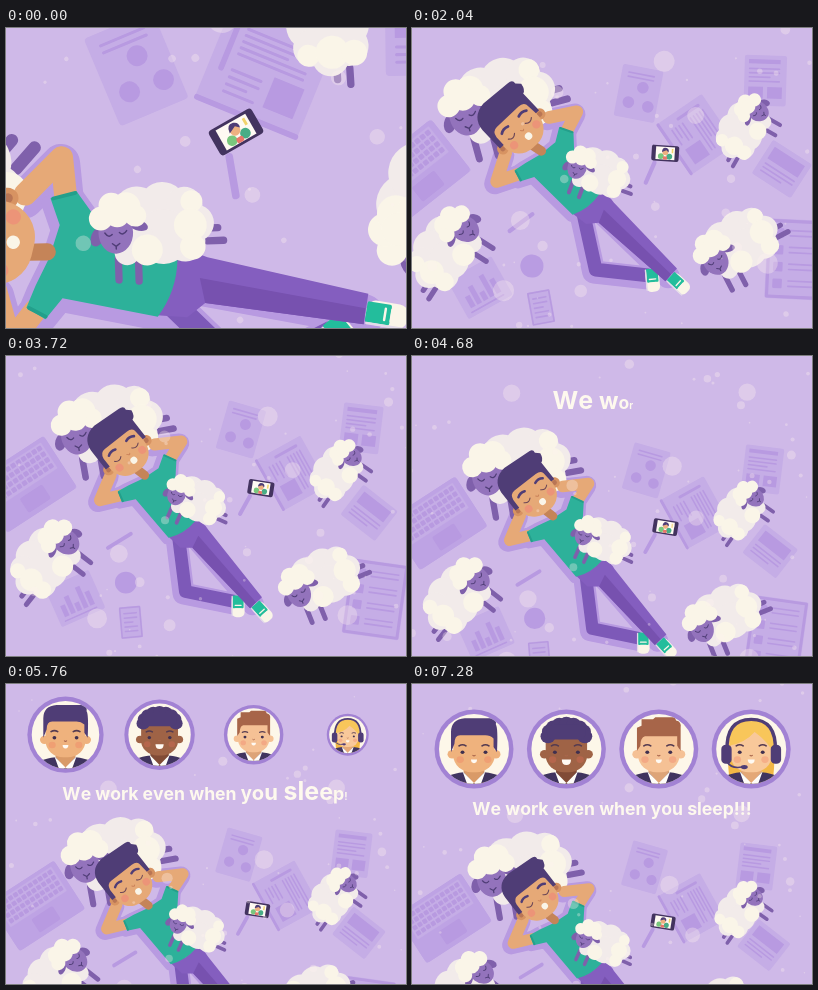
Write an HTML page with a canvas that moves like this. It is 400x300 px and loops after 7.32 s.

```html
<!DOCTYPE html>
<html lang="en">
<head>
<meta charset="utf-8">
<title>We work even when you sleep</title>
<style>
  html, body { margin: 0; width: 100%; height: 100%; overflow: hidden; background: #cfb9e8; }
  canvas { display: block; width: 100vw; height: 100vh; }
</style>
</head>
<body>
<canvas id="stage" width="400" height="300"></canvas>
<script>
const canvas = document.getElementById('stage');
const g = canvas.getContext('2d');
const LOOP = 7320, DEG = Math.PI / 180;
const BG = '#cfb9e8', CREAM = '#faf5e8', WOOL = '#f2ebea', PURPLE = '#9373bc', DARK = '#4f3d76';
const SKIN = '#e6a977', TEAL = '#2db19a', PANTS = '#845ebf', MARK = '#b89ae1', PAPER = '#c5ade6';
const clamp = v => Math.max(0, Math.min(1, v));

function dot(x, y, r, color) {
  g.fillStyle = color;
  g.beginPath();
  g.arc(x, y, r, 0, 7);
  g.fill();
}
function oval(x, y, rx, ry, color, turn = 0) {
  g.fillStyle = color;
  g.beginPath();
  g.ellipse(x, y, rx, ry, turn * DEG, 0, 7);
  g.fill();
}
function box(x, y, w, h, color, r = 0) {
  g.fillStyle = color;
  g.beginPath();
  g.roundRect(x, y, w, h, r);
  g.fill();
}
function shape(d, color) {
  g.fillStyle = color;
  g.fill(new Path2D(d));
}
function line(d, color, width) {
  g.strokeStyle = color;
  g.lineWidth = width;
  g.lineCap = g.lineJoin = 'round';
  g.stroke(new Path2D(d));
}
function at(x, y, turn, sx, sy, draw) {
  g.save();
  g.translate(x, y);
  g.rotate(turn * DEG);
  g.scale(sx, sy);
  draw();
  g.restore();
}

function sheep(x, y, turn, size, flip = 1) {
  at(x, y, turn, size * flip, size, () => {
    line('M25 1H32M26 8H35M-23 16V28M-12 16V29', '#7f60ab', 4);
    for (const [bx, by, r] of [[-12, -10, 13], [2, -12, 13], [14, -12, 10], [20, -2, 10],
      [14, 8, 11], [2, 5, 15], [-14, 6, 11], [-18, 13, 7]]) dot(bx, by, r, WOOL);
    dot(18, -14, 6, CREAM);
    dot(17, -1, 9, CREAM);
    dot(18, 11, 7, CREAM);
    oval(-34, 4, 3.5, 5.5, '#7f60ab', 25);
    oval(-12, -2, 6, 3, '#7f60ab', 20);
    oval(-24, 2, 9.5, 11.5, PURPLE);
    dot(-7, 12, 8.5, CREAM);
    for (const [bx, by, r] of [[-32, -6, 6.5], [-26, -13, 7], [-18, -12, 8], [-13, -7, 6], [-23, -8, 7]])
      dot(bx, by, r, CREAM);
    line('M-30 2Q-28 5 -26 3M-22 2Q-20 4 -18 1M-26 8L-24 9.5L-22 8M-24 9.5V11', DARK, 0.8);
  });
}

function paper(x, y, w, h, turn, draw) {
  at(x, y, turn, 1, 1, () => {
    box(-w / 2, -h / 2, w, h, PAPER, 2);
    draw(-w / 2, -h / 2);
  });
}
function rows(x, y, w, n, gap) {
  for (let i = 0; i < n; i++) box(x, y + i * gap, w * (i % 3 === 2 ? 0.7 : 1), 1.6, MARK, 1);
}

function ground() {
  paper(18, 128, 84, 62, -33, (x, y) => {
    box(x, y, 84, 62, '#bea3e4', 4);
    box(x + 6, y + 4, 72, 31, PAPER, 1);
    for (let r = 0; r < 4; r++)
      for (let k = 0; k < 11; k++) box(x + 8 + k * 6.3, y + 6 + r * 7, 5, 5, '#b89ae0', 1);
    box(x + 29, y + 40, 27, 17, MARK, 2);
  });
  paper(235, 73, 39, 50, 16, (x, y) => {
    rows(x + 6, y + 6, 26, 2, 4);
    dot(3, -6, 5.5, MARK);
    dot(-8, 10, 5.5, MARK);
    dot(11, 11, 5.5, MARK);
  });
  paper(286, 117, 58, 52, 61, (x, y) => {
    line('M-28 25H28', MARK, 3);
    line('M-22 -17L-22 6', MARK, 3);
    rows(x + 12, y + 7, 38, 5, 3.5);
    box(6, 0, 17, 17, MARK);
    rows(x + 12, 4, 18, 4, 4);
  });
  paper(356, 72, 40, 48, 7, (x, y) => {
    box(x + 4, y + 4, 30, 4, MARK);
    rows(x + 4, y + 12, 30, 4, 4);
    box(x + 4, 6, 14, 11, MARK);
    box(2, 6, 14, 11, MARK);
  });
  paper(364, 157, 44, 38, 38, (x, y) => {
    box(x + 5, y + 5, 34, 13, MARK);
    rows(x + 5, y + 22, 34, 3, 4);
  });
  paper(370, 244, 58, 76, 8, (x, y) => {
    line('M-27 -36H27V36H-27Z', '#b89ae0', 3);
    for (let i = 0; i < 4; i++) {
      box(x + 7, y + 9 + i * 16, 9, 9, MARK, 1);
      rows(x + 21, y + 10 + i * 16, 29, 2, 5);
    }
  });
  paper(68, 243, 48, 42, -24, (x, y) => {
    [12, 19, 9, 23, 15].forEach((h, i) => box(x + 7 + i * 7, 13 - h, 5, h, MARK));
    rows(x + 5, 16, 36, 1, 4);
  });
  paper(124, 267, 22, 32, -5, (x, y) => {
    line('M-10 -15H10V15H-10Z', '#b89ae0', 1.5);
    rows(x + 4, y + 6, 14, 5, 4.5);
  });
  line('M101 192L124 178', MARK, 4);
  dot(119, 227, 11, '#b99ce2');
  line('M244 140L234 158', MARK, 4);
}

function phone() {
  at(255, 132, 9, 1, 1, () => {
    box(-13, -7.5, 26, 15, '#43335f', 2);
    box(-9, -6, 18, 12, '#fffaf3');
    dot(-4, 3, 2.8, '#79c77d');
    dot(4, 3, 2.8, '#48ad86');
    dot(0, -1, 2.8, '#eeb080');
    shape('M-3.2 -1Q-3 -6 1 -5Q4 -4 3 -1L1 -3Z', DARK);
    box(-2, 3, 4, 3, '#e8776a', 1);
    box(6, -4.5, 1.5, 4, '#f2d36b');
  });
}

const LEG_BACK = 'M172 180L179 236L228 246', LEG_FRONT = 'M186 174L249 247';
const ARMS = 'M114 139L93 144L104 118M164 102L175 85L148 88';
const SHIRT = 'M122 129L137 122L152 112L157 98L170 104L169 122L189 165Q178 178 162 182L129 143L115 146L111 135Z';

function shoe(x, y, turn) {
  at(x, y, turn, 1, 1, () => {
    box(-10, -6.5, 22, 13, CREAM, 5);
    box(-10, -5.5, 13, 11, '#23bd9c', 1);
    line('M0 -3V3M3.5 -3V3', CREAM, 1.3);
    line('M-9 6H10', '#e3dbe9', 1.3);
  });
}

function shadow() {
  g.save();
  g.translate(-2, 2);
  line(LEG_BACK + LEG_FRONT, MARK, 22);
  line(ARMS, MARK, 20);
  line(SHIRT, MARK, 9);
  g.restore();
}

function person() {
  line(LEG_BACK, '#7d59b8', 13);
  shoe(232, 250, 90);
  shape('M162 181Q178 178 189 164Q198 166 202 174L256 242L244 253L186 192L174 192Z', PANTS);
  shape('M192 180L250 247L244 253L186 192Z', '#7751af');
  shoe(256, 256, 48);
  line(ARMS, SKIN, 12);
  shape(SHIRT, TEAL);
  line('M112 136L116 145M158 99L169 104', '#239f8b', 2);
  line('M129 112L138 119', '#c58458', 9);
  at(117, 94, -38, 1, 1, head);
}

function head() {
  for (const x of [-24, 24]) {
    dot(x, 6, 5.5, '#d79362');
    dot(x, 6, 2.5, '#b97655');
  }
  g.fillStyle = SKIN;
  g.beginPath();
  g.roundRect(-22, -26, 44, 51, [10, 10, 19, 19]);
  g.fill();
  shape('M-26 4V-20Q-25 -36 -8 -38L22 -36Q28 -36 27 -31L31 -27Q30 -20 26 -19V3H22L21 -9Q20 -13 14 -13H-14Q-20 -13 -21 -6V4Z', DARK);
  dot(-14, 11, 4, '#ec9478');
  dot(15, 11, 4, '#ec9478');
  line('M-15 -5Q-11 -8 -6 -6M8 -6Q13 -8 17 -5', DARK, 2.6);
  line('M-14 3Q-10 7 -6 3M8 3Q12 7 16 3', '#6b4657', 1.1);
  line('M0 5Q2 8 3 6', '#c98058', 1);
  dot(2, 14, 3.5, CREAM);
}

// Seeded floating motes, plus a few large soft ones.
let seed = 11;
const rnd = () => (seed = (seed * 16807) % 2147483647) / 2147483647;
const motes = Array.from({ length: 100 }, () =>
  ({ x: rnd() * 520 - 60, y: rnd() * 520 - 180, r: 0.8 + 4.4 * rnd() ** 1.8, k: rnd() }));
for (const [x, y, r] of [[262, 60, 10], [287, 114, 8], [90, 263, 10], [342, 260, 10], [112, 198, 9],
  [95, -16, 9], [340, -17, 9], [158, 80, 6], [163, 270, 6], [315, 177, 4]]) motes.push({ x, y, r, k: 0.5 });

function drawMotes(t) {
  const s = (t - 3720) / 1000;
  for (const m of motes) dot(m.x + s * (m.k - 0.5) * 5, m.y + s * (6 + m.k * 6), m.r, 'rgba(255,244,240,.32)');
}

function collar(color) {
  box(-9, 15, 18, 18, color, 3);
  shape('M-31 36Q-28 24 -9 22L0 33L9 22Q28 24 31 36Z', '#40345f');
  shape('M-10 21L0 32L-5 36ZM10 21L0 32L5 36Z', '#fffdf8');
}
function face(skin, smile = 2.6) {
  dot(-19, 5, 4, skin);
  dot(19, 5, 4, skin);
  g.fillStyle = skin;
  g.beginPath();
  g.roundRect(-18, -22, 36, 44, [8, 8, 16, 16]);
  g.fill();
  dot(-12, 10, 3.2, 'rgba(235,110,90,.28)');
  dot(12, 10, 3.2, 'rgba(235,110,90,.28)');
  dot(-10, 3, 1.7, '#40304f');
  dot(10, 3, 1.7, '#40304f');
  line('M-13 -3Q-10 -5 -7 -3M7 -3Q10 -5 13 -3', '#553b50', 1.5);
  at(0, 10, 0, smile, smile, () => shape('M-1 0H1Q1 1.3 0 1.3Q-1 1.3 -1 0Z', '#fffaf3'));
  line('M-1 6Q0 7 1 6', '#a9664c', 1);
}

const team = [
  () => {
    collar('#d99a68');
    face('#efb27d');
    shape('M-20 3V-16Q-20 -28 -8 -29H15Q20 -29 19 -23Q21 -20 20 3L17 -2V-10Q14 -13 10 -13H-12Q-17 -13 -17 -5Z', DARK);
  },
  () => {
    collar('#814b36');
    face('#9f6346', 4);
    for (let i = 0; i < 9; i++) {
      const a = (180 + i * 22.5) * DEG;
      dot(Math.cos(a) * 16, -12 + Math.sin(a) * 12, 6.5, DARK);
    }
    box(-17, -23, 34, 14, DARK, 6);
  },
  () => {
    collar('#dda478');
    face('#f5c195');
    shape('M-19 2V-20L-15 -22V-28H-5L-3 -30H14L15 -27Q20 -26 19 -20V2L16 -3V-12H-12Q-16 -11 -16 -3Z', '#a76549');
  },
  () => {
    shape('M-19 28Q-25 -28 0 -28Q25 -28 19 28Q0 34 -19 28Z', '#f2b745');
    collar('#e4a877');
    face('#f8c89a', 3);
    shape('M-20 6Q-24 -26 2 -27Q23 -25 20 6Q16 -6 3 -16Q-6 -5 -20 -3Z', '#f8c65a');
    line('M-21 2Q-22 -28 0 -28Q22 -28 21 2', DARK, 3);
    box(-26, -4, 9, 18, DARK, 4);
    box(17, -4, 9, 18, DARK, 4);
    line('M-21 12Q-17 19 -8 17', DARK, 1.6);
    oval(-6, 17, 3, 2, DARK);
  }
];

function portraits(t, y, spread) {
  team.forEach((draw, i) => {
    const k = 1 - (1 - clamp((t - 5290 - i * 105) / 700)) ** 3;
    if (k <= 0) return;
    at(200 + (i * 92.4 - 138) * spread, y, 0, k, k, () => {
      dot(0, 0, 39.5, '#a282d4');
      dot(0, 0, 35, '#fdf7e9');
      g.beginPath();
      g.arc(0, 0, 35, 0, 7);
      g.clip();
      g.scale(1.15, 1.06);
      draw();
    });
  });
}

const SLOGAN = [...'We work even when you sleep!!!'];
function letterSize(age) {
  if (age <= 0) return 0;
  if (age < 200) return 1.42 * Math.sin(age / 200 * Math.PI / 2);
  return 1 + 0.42 * (1 + Math.cos(clamp((age - 270) / 290) * Math.PI)) / 2;
}
function slogan(t, y) {
  if (t < 4386) return;
  g.font = '700 17.6px Inter, Roboto, sans-serif';
  g.fillStyle = '#fef9ee';
  const letters = SLOGAN.map((ch, i) => {
    const k = letterSize(t - 4386 - i * 49);
    return { ch, k, w: g.measureText(ch).width * Math.max(k, 0.18) };
  });
  let x = 200 - letters.reduce((sum, l) => sum + l.w, 0) / 2;
  for (const { ch, k, w } of letters) {
    if (k > 0) at(x, y, 0, k, k, () => g.fillText(ch, 0, 0));
    x += w;
  }
}

function draw(t) {
  const u = clamp(1 - t / 4200);
  const p = (1 - Math.cos(clamp((t - 3370) / 3060) * Math.PI)) / 2;
  const zoom = Math.exp(0.642 * u ** 3.8) * (1 - 0.075 * p ** 0.7);
  const lag = 11 * p * p;

  g.fillStyle = BG;
  g.fillRect(0, 0, 400, 300);
  at(255 - 25 * u ** 4 - 4 * p, 128.6 - 24.6 * u ** 3 + 109.4 * p, -38.8 * u ** 3, zoom, zoom, () => {
    g.translate(-255, -132);
    ground();
    g.save();
    g.translate(0, lag);
    shadow();
    sheep(108, 69 - lag * 0.4, -10, 1.65);
    person();
    sheep(192, 146, 24 + 13 * u ** 3, 0.96);
    g.restore();
    phone();
    sheep(331 + lag * 0.6, 118 + lag * 0.4, -55, 0.97, -1);
    sheep(38, 208, -52, 1.26, -1);
    sheep(320, 224, -22, 1.25);
    drawMotes(t);
  });

  const rise = 126 * (1 - p);
  portraits(t, 65 - rise, 1 + 0.16 * (1 - p));
  slogan(t, 130.5 - rise);
}

const start = performance.now();
function tick() {
  draw((performance.now() - start) % LOOP);
  requestAnimationFrame(tick);
}
tick();
</script>
</body>
</html>
```
